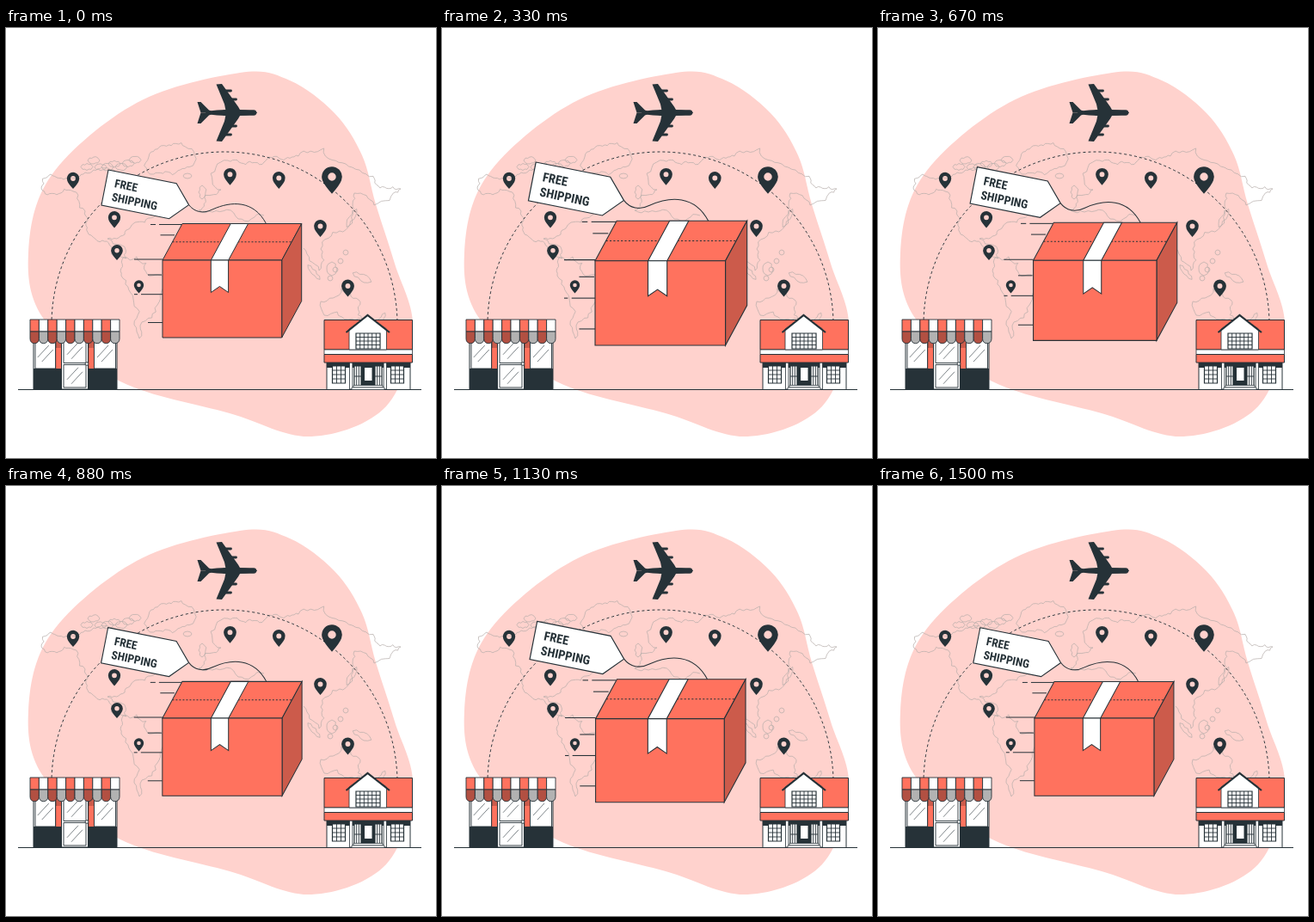
These frames come from a looping animation (500 px wide and 500 px high, 1540 ms). An HTML page with a canvas:

```html
<!DOCTYPE html>
<html lang="en">
<head>
<meta charset="utf-8">
<title>Free shipping</title>
<style>
  html, body { margin: 0; width: 100%; height: 100%; overflow: hidden; background: #fff; }
  canvas { display: block; width: 500px; height: 500px; }
</style>
</head>
<body>
<canvas id="stage"></canvas>
<script>
const canvas = document.getElementById('stage');
const ctx = canvas.getContext('2d');
const ratio = window.devicePixelRatio || 1;
canvas.width = canvas.height = 500 * ratio;

const INK = '#263238', CORAL = '#ff725e', DARK_CORAL = '#cc5b4b', PINK = '#ffd2cd';
const LOOP = 1540, STEPS = 37;

// Fill a path, then outline it.
function paint(path, fill, stroke, width = 1) {
  if (fill) { ctx.fillStyle = fill; ctx.fill(path, 'evenodd'); }
  if (stroke) { ctx.strokeStyle = stroke; ctx.lineWidth = width; ctx.stroke(path); }
}

function poly(points, closed = true) {
  const path = new Path2D();
  for (let i = 0; i < points.length; i += 2) path.lineTo(points[i], points[i + 1]);
  if (closed) path.closePath();
  return path;
}

const shape = (points, fill, stroke, width) => paint(poly(points), fill, stroke, width);
const line = (points, width) => paint(poly(points, false), null, INK, width);
const rect = (x, y, w, h, fill, stroke, width) =>
  shape([x, y, x + w, y, x + w, y + h, x, y + h], fill, stroke, width);

function dashed(path, dash) {
  ctx.setLineDash([dash, dash]);
  paint(path, null, INK);
  ctx.setLineDash([]);
}

// Closed Catmull-Rom curve.
function smooth(p) {
  const path = new Path2D(), n = p.length / 2;
  const at = i => { const k = (i + n) % n; return [p[2 * k], p[2 * k + 1]]; };
  path.moveTo(p[0], p[1]);
  for (let i = 0; i < n; i++) {
    const [a, b, c, d] = [at(i - 1), at(i), at(i + 1), at(i + 2)];
    path.bezierCurveTo(b[0] + (c[0] - a[0]) / 6, b[1] + (c[1] - a[1]) / 6,
      c[0] - (d[0] - b[0]) / 6, c[1] - (d[1] - b[1]) / 6, c[0], c[1]);
  }
  return path;
}

const blob = smooth([272, 52, 330, 61, 382, 99, 414, 148, 430, 205, 452, 274, 473, 350,
  442, 440, 355, 475, 260, 448, 133, 411, 45, 340, 26, 262, 53, 171, 152, 87]);

let seed = 7;
function random() {
  seed = (seed * 16807) % 2147483647;
  return seed / 2147483647 - 0.5;
}

const map = new Path2D();

// A rough coast line: each stretch is halved with seeded sideways shifts.
function coast(p, closed = true) {
  const path = new Path2D();
  const split = (x0, y0, x1, y1) => {
    if (Math.hypot(x1 - x0, y1 - y0) < 5) return path.lineTo(x1, y1);
    const k = random() * 0.5;
    const x = (x0 + x1) / 2 - (y1 - y0) * k, y = (y0 + y1) / 2 + (x1 - x0) * k;
    split(x0, y0, x, y);
    split(x, y, x1, y1);
  };
  path.moveTo(p[0], p[1]);
  for (let i = 2; i < p.length; i += 2) split(p[i - 2], p[i - 1], p[i], p[i + 1]);
  if (closed) split(p[p.length - 2], p[p.length - 1], p[0], p[1]);
  map.addPath(path);
}

function island(x, y, rx, ry, tilt = 0) {
  const ring = [];
  for (let a = 0; a < Math.PI * 2; a += Math.PI / 4) {
    const u = rx * Math.cos(a), v = ry * Math.sin(a);
    ring.push(x + u * Math.cos(tilt) - v * Math.sin(tilt), y + u * Math.sin(tilt) + v * Math.cos(tilt));
  }
  coast(ring);
}

// The Americas, Eurasia, the Mediterranean and Australia
coast([41, 186, 52, 170, 92, 168, 130, 170, 150, 190, 185, 203, 150, 226, 138, 240,
  118, 245, 140, 268, 112, 247, 92, 213, 78, 190]);
coast([136, 267, 152, 266, 187, 293, 176, 322, 156, 346, 155, 361, 149, 345, 148, 315, 134, 288]);
coast([224, 212, 250, 188, 240, 178, 258, 154, 300, 156, 340, 149, 395, 158, 459, 187,
  428, 206, 405, 192, 388, 236, 366, 257, 364, 282, 346, 256], false);
coast([224, 212, 240, 214, 270, 222, 300, 218], false);
coast([366, 318, 390, 303, 410, 316, 414, 338, 398, 339, 370, 334]);
// Greenland, Iceland, Britain, Japan, New Zealand, New Guinea, Borneo, Sumatra
island(190, 154, 30, 17, -0.2);
island(211, 172, 5, 3);
island(228, 191, 4, 8);
island(402, 221, 3, 12, 0.5);
island(436, 340, 3, 10, 0.5);
island(414, 290, 12, 4, 0.45);
island(379, 280, 6, 8);
island(358, 284, 3, 11, -0.7);
// Scattered Arctic and Pacific islands
for (let i = 0; i < 8; i++) {
  island(94 + i * 8, 157 + random() * 14, 7, 4);
  if (i % 2) island(374 + i * 3, 296 - i * 5, 3, 3);
}

function pin(x, y, r) {
  const tip = y + r * 1.68;
  const path = new Path2D();
  path.arc(x, y, r, Math.PI * 0.88, Math.PI * 0.12);
  path.quadraticCurveTo(x + r * 0.75, y + r * 0.85, x, tip);
  path.quadraticCurveTo(x - r * 0.75, y + r * 0.85, x - r * 0.93, y + r * 0.37);
  path.moveTo(x + r * 0.4, y);
  path.arc(x, y, r * 0.4, 0, Math.PI * 2);
  paint(path, INK);
}

function plane() {
  const fuselage = new Path2D();
  fuselage.ellipse(262, 98.5, 30, 3.6, 0, 0, Math.PI * 2);
  paint(fuselage, INK);
  ctx.lineCap = 'round';
  line([254, 98.5, 288, 98.5], 6.4);
  for (const side of [-1, 1]) {
    const y = d => 98.5 + side * d;
    shape([256, y(0), 254, y(10), 244.5, y(33), 251, y(33.5), 260, y(21), 270, y(7), 274, y(0)], INK);
    shape([226.5, y(0), 222.5, y(12.5), 226.5, y(12.5), 236, y(3), 244, y(0)], INK);
    line([256, y(25.5), 261.5, y(25.5)], 2.8);
    line([262, y(15.5), 267.5, y(15.5)], 2.8);
  }
  ctx.lineCap = 'butt';
}

function glass(x, y, w, h) {
  rect(x, y, w, h, '#fff', INK, 0.9);
  const cx = x + w / 2, cy = y + h / 2;
  for (const d of [-2, 3]) line([cx + d - 7, cy + d + 6, cx + d + 6, cy + d - 8], 0.6);
}

function shop() {
  rect(32, 360, 97, 60, '#fff', INK);
  for (const x of [58, 96]) {
    rect(x, 362, 6.5, 34, DARK_CORAL, INK, 0.7);
    rect(x + 0.3, 372, 5.9, 24, CORAL);
  }
  glass(34, 362, 23.5, 34);
  glass(102.5, 362, 25, 34);
  rect(32, 396, 97, 24.5, INK);
  rect(64.5, 362, 31, 58, '#fff', INK);
  glass(67, 362, 26, 27.5);
  glass(67, 391.5, 26, 26.5);
  const knob = new Path2D();
  knob.arc(94, 390.5, 1.8, 0, Math.PI * 2);
  paint(knob, '#fff', INK, 0.9);

  const w = 10.4;
  for (let i = 0; i < 10; i++) {
    const x = 28 + i * w, odd = i % 2;
    rect(x, 339, w, 14, odd ? '#fff' : CORAL, INK, 0.9);
    const flap = new Path2D();
    flap.moveTo(x, 353);
    flap.lineTo(x, 361.5);
    flap.bezierCurveTo(x, 368.5, x + w, 368.5, x + w, 361.5);
    flap.lineTo(x + w, 353);
    flap.closePath();
    paint(flap, odd ? '#b2b2b2' : '#b25042', INK, 0.9);
  }
}

function panes(x, y, w, h, cols, rows) {
  rect(x, y, w, h, '#fff', INK, 1.2);
  for (let i = 1; i < cols; i++) line([x + w * i / cols, y, x + w * i / cols, y + h], 0.9);
  for (let i = 1; i < rows; i++) line([x, y + h * i / rows, x + w, y + h * i / rows], 0.9);
}

function house() {
  rect(373, 389, 97, 31.5, '#fff', INK);
  rect(373, 389, 97, 6, INK);
  rect(413, 393, 17, 23, INK);
  rect(417, 395, 8.5, 15, '#fff');
  for (const side of [-1, 1]) {
    const x = d => 421 + side * d;
    panes(x(34) - 7.5, 393, 15, 20, 3, 4);
    panes(x(12) - 4, 393, 8, 24, 3, 2);
    rect(x(19.8) - 1.7, 389, 3.4, 31, '#fff', INK, 0.8);
  }
  rect(404, 415.5, 34, 2.5, '#fff', INK, 0.7);
  rect(402, 418, 38, 2.5, '#fff', INK, 0.7);

  rect(370, 339.5, 102.5, 34.5, CORAL, INK);
  rect(370, 374, 102.5, 5.5, '#fff', INK, 0.8);
  rect(370, 379.5, 102.5, 9.5, CORAL, INK);
  shape([399, 374, 399, 350, 420.5, 334.5, 442.5, 350, 442.5, 374], '#fff', INK, 0.8);
  line([395.5, 354, 420.5, 334, 446, 354], 2.2);
  panes(407, 355, 28, 18, 6, 4);
}

function tag() {
  shape([119, 165, 198.2, 180.7, 212.6, 205.6, 189.7, 221.7, 111, 206], '#fff', INK, 1.1);
  ctx.save();
  ctx.translate(125.5, 185);
  ctx.rotate(0.205);
  const face = size =>
    `condensed bold ${size}px "Roboto Condensed", "Liberation Sans Narrow", Roboto, sans-serif`;
  ctx.font = face(16);
  ctx.font = face(Math.min(16, 16 * 54 / ctx.measureText('SHIPPING').width));
  ctx.fillStyle = INK;
  ctx.fillText('FREE', 0, 0);
  ctx.fillText('SHIPPING', 0, 16.2);
  ctx.restore();
}

function box() {
  const left = 182, right = 320.7, top = 270, bottom = 360, dx = 23, dy = -42.5;
  // A slanted band on the lid between two x positions.
  const lid = (a, b, fill) => shape([a, top, a + dx, top + dy, b + dx, top + dy, b, top], fill, INK);
  lid(left, right, CORAL);
  dashed(poly([left + dx / 2, top + dy / 2, right + dx / 2, top + dy / 2], false), 2);
  shape([right, top, right + dx, top + dy, right + dx, bottom + dy, right, bottom], DARK_CORAL, INK);
  rect(left, top, right - left, bottom - top, CORAL, INK);
  const a = 238.3, b = 258.6, mid = (a + b) / 2;
  lid(a, b, '#fff');
  shape([a, top, b, top, b, 307.5, mid, 300.5, a, 307.5], '#fff', INK);
}

function speedLine(x, y, end, dash = 0) {
  if (dash) line([x, y, x + dash, y]);
  line([dash ? x + dash + 4 : x, y, end, y]);
}

function parcel(scale) {
  ctx.save();
  ctx.translate(225, 262);
  ctx.scale(scale, scale);
  ctx.translate(-225, -262);
  speedLine(168, 228.5, 204, 6);
  speedLine(179.5, 240.8, 196);
  speedLine(149, 269, 182);
  speedLine(165, 287, 181);
  speedLine(149, 309.7, 182, 4);
  speedLine(165, 342.5, 182);
  box();
  paint(new Path2D('M212.6 205.6C219 214 229 216.5 240 211C262 201 288 200 302.5 227.5'), null, INK);
  tag();
  ctx.restore();
}

function scene(scale) {
  ctx.setTransform(ratio, 0, 0, ratio, 0, 0);
  ctx.fillStyle = '#fff';
  ctx.fillRect(0, 0, 500, 500);
  paint(blob, PINK);
  paint(map, null, '#b5acaa', 0.7);

  const route = new Path2D();
  route.arc(254, 345, 201, Math.PI, 0);
  dashed(route, 3);

  pin(78, 175, 7.2);
  pin(126, 220.3, 7.2);
  pin(129, 258.7, 6.8);
  pin(154.5, 299, 5.7);
  pin(260.5, 170.3, 7.4);
  pin(317.3, 174.5, 7.4);
  pin(379, 173, 11.8);
  pin(365.5, 230.5, 7.4);
  pin(397.5, 300, 7.4);

  plane();
  line([14, 420.5, 483, 420.5]);
  shop();
  house();
  parcel(scale);
}

// Two linear beats per loop, shown at 24 steps a second.
const beats = [[0, 1], [290, 1.1], [862, 1], [1195, 1.1], [1505, 1], [LOOP, 1]];

function scaleAt(time) {
  const step = LOOP / STEPS;
  const t = Math.floor((time + 5) / step) % STEPS * step;
  const i = beats.findIndex(beat => beat[0] > t);
  const [t0, s0] = beats[i - 1], [t1, s1] = beats[i];
  return s0 + (s1 - s0) * (t - t0) / (t1 - t0);
}

const start = performance.now();
function tick() {
  scene(scaleAt((performance.now() - start) % LOOP));
  requestAnimationFrame(tick);
}
tick();
</script>
</body>
</html>
```
